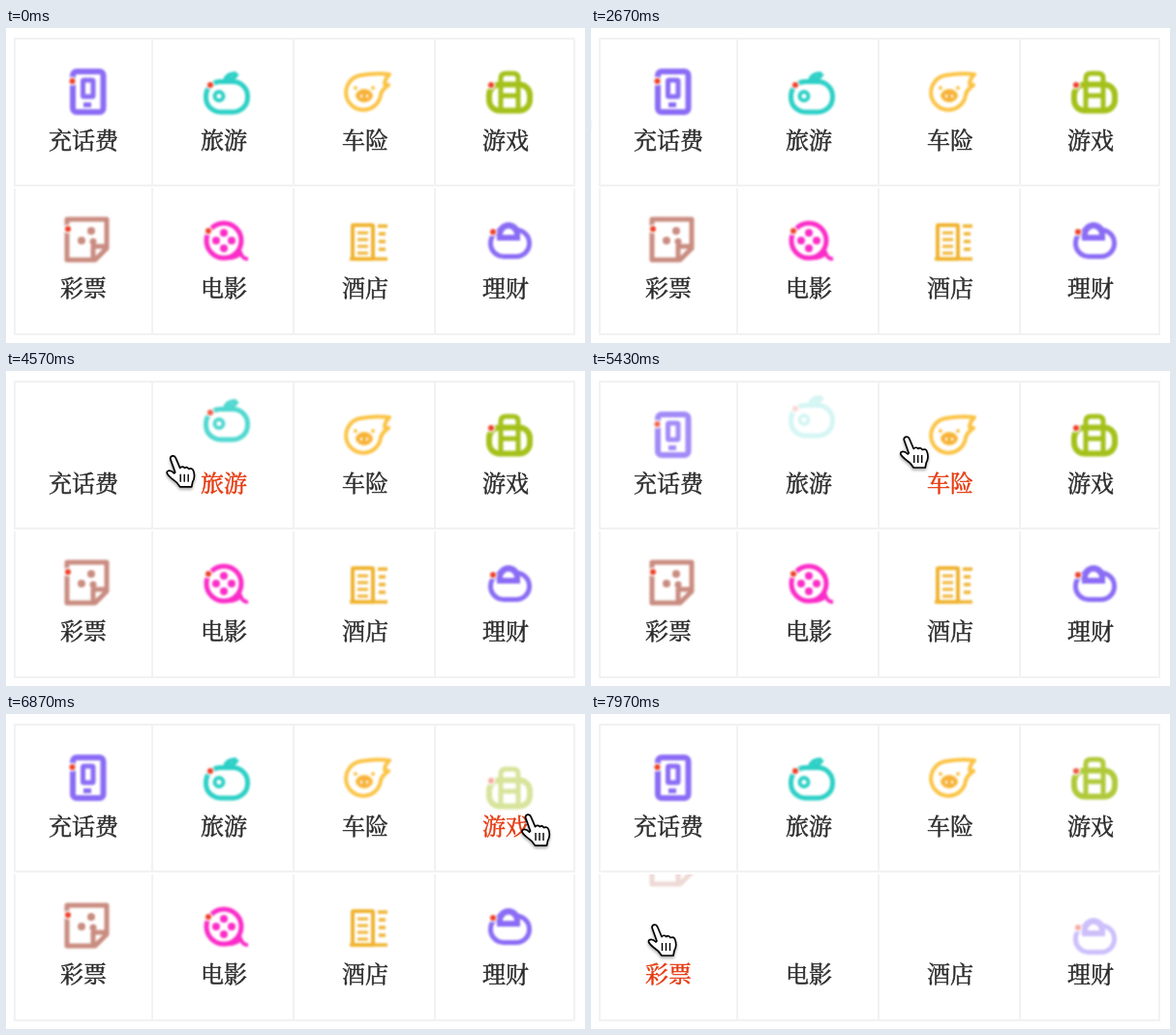
Recreate the animation shown at these times as an HTML page. Size 598 px wide and 326 px high, loop 8000 ms.

```html
<!DOCTYPE html>
<html lang="zh">
<meta charset="utf-8">
<style>
  html, body { margin: 0; height: 100%; overflow: hidden; background: #fff; }
  svg { display: block; }
  text {
    font: 24px "Noto Serif CJK SC", "Noto Sans CJK SC", "Noto Sans CJK", serif;
    text-anchor: middle; fill: currentColor; stroke: currentColor; stroke-width: .5px;
  }
  .icon { filter: blur(.8px); fill: none; stroke-linejoin: round; }
  .solid { fill: var(--ink); stroke: none; }
  .hole { fill: #fff; stroke: none; }
</style>
<svg id="stage" width="598" height="326" viewBox="0 0 598 326">
  <defs>
    <clipPath id="row0"><rect y="12" width="598" height="150"/></clipPath>
    <clipPath id="row1"><rect y="166" width="598" height="150"/></clipPath>
  </defs>
  <path d="M8 11H588M8 163H588M8 317H588M9 10V164M151 10V164M297 10V164M443 10V164M587 10V164M9 166V318M151 166V318M297 166V318M443 166V318M587 166V318" stroke="#f2f2f2" stroke-width="2"/>
  <g id="cells"></g>
  <g id="hand" stroke-linejoin="round" style="filter:drop-shadow(0 2px 1.5px #0005)">
    <path d="M-4 3C-4-.5 0-1 1.500 2L6 12.500Q8 10 11 12.500Q13 10.500 15 13.500Q19 12 20 16Q22 22 19 27L18 32H6Q3 27-3 23Q-9 18-7 16Q-4 14 0 18L1 17Z" fill="#fff" stroke="#000" stroke-width="1.7"/>
    <path d="M6.500 19V27M10.500 19V27M14.500 19V27" stroke="#000" stroke-width="1.4"/>
  </g>
</svg>
<script>
const LOOP = 8000, TICK = 38, HOVER_FROM = 3690;

const dot = (x, y, r = 4) => `<circle class="solid" cx="${x}" cy="${y}" r="${r}"/>`;
const line = (d, w = 5) => `<path d="${d}" stroke-width="${w}"/>`;
const box = (x, y, w, h, r, s = 5) =>
  `<rect x="${x}" y="${y}" width="${w}" height="${h}" rx="${r}" stroke-width="${s}"/>`;
const badge = (x, y) => `<circle class="hole" cx="${x}" cy="${y}" r="4.500"/>
  <circle cx="${x}" cy="${y}" r="3" fill="#f04028" stroke="none"/>`;

// enter: moments at which the pointer triggers the icon
const cells = [
  { label: '充话费', ink: '#8b6cf5', enter: [3690, 4475], art:
    box(69, 45, 31.5, 42, 4, 6) + box(79.5, 54, 10.5, 17, 1) + line('M80 79.500H88') + badge(68.5, 55) },
  { label: '旅游', ink: '#2dd0c6', enter: [4500, 5345], art:
    box(206.5, 55.5, 43, 31.5, 15) + line('M226 54Q228 47 238 47M229 53Q236 53 239 47', 4) +
    `<circle cx="220" cy="70.500" r="4.500" stroke-width="4"/>` + badge(211, 59) },
  { label: '车险', ink: '#fbc344', enter: [5450], art:
    line('M366 49Q382 46 396 48Q391 53 391 58L395 59Q388 64 387 69A18 18 0 1 1 366 49Z', 4) +
    `<ellipse cx="370" cy="70" rx="8.500" ry="6.500" fill="#f7b23a"/>
     <path class="hole" d="M366 69h2v3h-2zM372 69h2v3h-2z"/>` + dot(361, 62, 2) + dot(379, 62, 2) },
  { label: '游戏', ink: '#a4c11b', enter: [5985, 6920], art:
    box(499, 58.5, 42, 27, 11, 6) + line('M511 86V52Q511 47 516 47H524Q529 47 529 52V86M511 70H529') +
    badge(501, 59) },
  { label: '彩票', ink: '#c98c80', enter: [7725], art:
    line('M63 198H104V228L92 240H63ZM104 226H90V240') + dot(88, 210) + dot(78, 220) + dot(90, 221, 3.5) +
    badge(64, 208) },
  { label: '电影', ink: '#fb2cc8', enter: [7620], art:
    `<circle cx="225" cy="220" r="18" stroke-width="5"/>` + line('M228 238Q240 238 242 232Q244 239 250 239', 4) +
    dot(225, 212) + dot(217, 220) + dot(233, 220) + dot(225, 228) + badge(209, 210) },
  { label: '酒店', ink: '#f0b432', enter: [7530], art:
    box(358, 204, 21, 35, 1, 4) + line('M363 212H374M363 219H374M363 226H374M363 233H374', 3) +
    line('M355 239H394M384 205H394M385 213H392M385 221H392M385 229H392', 3.5) },
  { label: '理财', ink: '#8b6cf5', enter: [7060], art:
    box(500.5, 209, 40, 27.5, 13.5) +
    `<path class="solid" d="M507 220V213A12 12 0 0 1 531 213V220Z"/>
     <path class="hole" d="M513 214A6 6.500 0 0 1 525 214Z"/>` + badge(503, 211) },
];

// time, x, y of the pointer tip
const pointer = [
  [2600, -40, 76], [2670, -23, 78], [3000, 60, 92], [3300, 86, 94], [4230, 86, 94], [4500, 155, 90],
  [4830, 242, 80], [5300, 242, 80], [5430, 327, 68], [6000, 447, 55], [6230, 541, 49], [6700, 541, 49],
  [7060, 540, 165], [7300, 538, 193], [7450, 510, 198], [7540, 443, 205], [7640, 296, 212],
  [7725, 150, 216], [7850, 80, 218], [7970, 67, 218],
];

const columns = [80, 225, 371, 516];
document.getElementById('cells').innerHTML = cells.map((c, i) => {
  const row = i >> 2;
  return `<g clip-path="url(#row${row})"><g class="icon" stroke="${c.ink}" style="--ink:${c.ink}">${c.art}</g></g>
    <text x="${columns[i % 4]}" y="${124.5 + 153.5 * row}">${c.label}</text>`;
}).join('');
const icons = document.querySelectorAll('.icon');
const labels = document.querySelectorAll('text');
const hand = document.getElementById('hand');

function approach(value, goal) {
  const step = (goal - value) / 6;
  return value + (step > 0 ? Math.ceil(step) : Math.floor(step));
}

// Rise and fade out, drop below the resting place, then rise and fade in.
function pose(enter, t) {
  let top = 20, alpha = 100;
  enter.forEach((start, i) => {
    const end = Math.min(enter[i + 1] ?? LOOP, t);
    let leaving = true;
    for (let n = Math.floor((end - start) / TICK); n > 0; n--) {
      if (leaving && top === -25 && alpha === 0) {
        top = 30;
        leaving = false;
      } else {
        top = approach(top, leaving ? -25 : 20);
        alpha = approach(alpha, leaving ? 0 : 100);
      }
    }
  });
  return { shift: 2 * (top - 20), alpha: alpha / 100 };
}

function pointerAt(t) {
  const next = pointer.findIndex(p => p[0] > t);
  if (next === 0) return [-60, 76];
  if (next < 0) return pointer.at(-1).slice(1);
  const a = pointer[next - 1], b = pointer[next], k = (t - a[0]) / (b[0] - a[0]);
  return [1, 2].map(j => a[j] + (b[j] - a[j]) * k);
}

function draw(now) {
  const t = now % LOOP;
  const [x, y] = pointerAt(t);
  const hovered = t < HOVER_FROM ? -1 : Math.floor((x - 5) / 146) + (y > 164 ? 4 : 0);
  cells.forEach((c, i) => {
    const { shift, alpha } = pose(c.enter, t);
    icons[i].setAttribute('transform', `translate(0 ${shift})`);
    icons[i].setAttribute('opacity', alpha);
    labels[i].setAttribute('color', i === hovered ? '#e63a10' : '#2c2c2c');
  });
  hand.setAttribute('transform', `translate(${x} ${y})`);
  requestAnimationFrame(draw);
}
requestAnimationFrame(draw);
</script>
</html>
```
